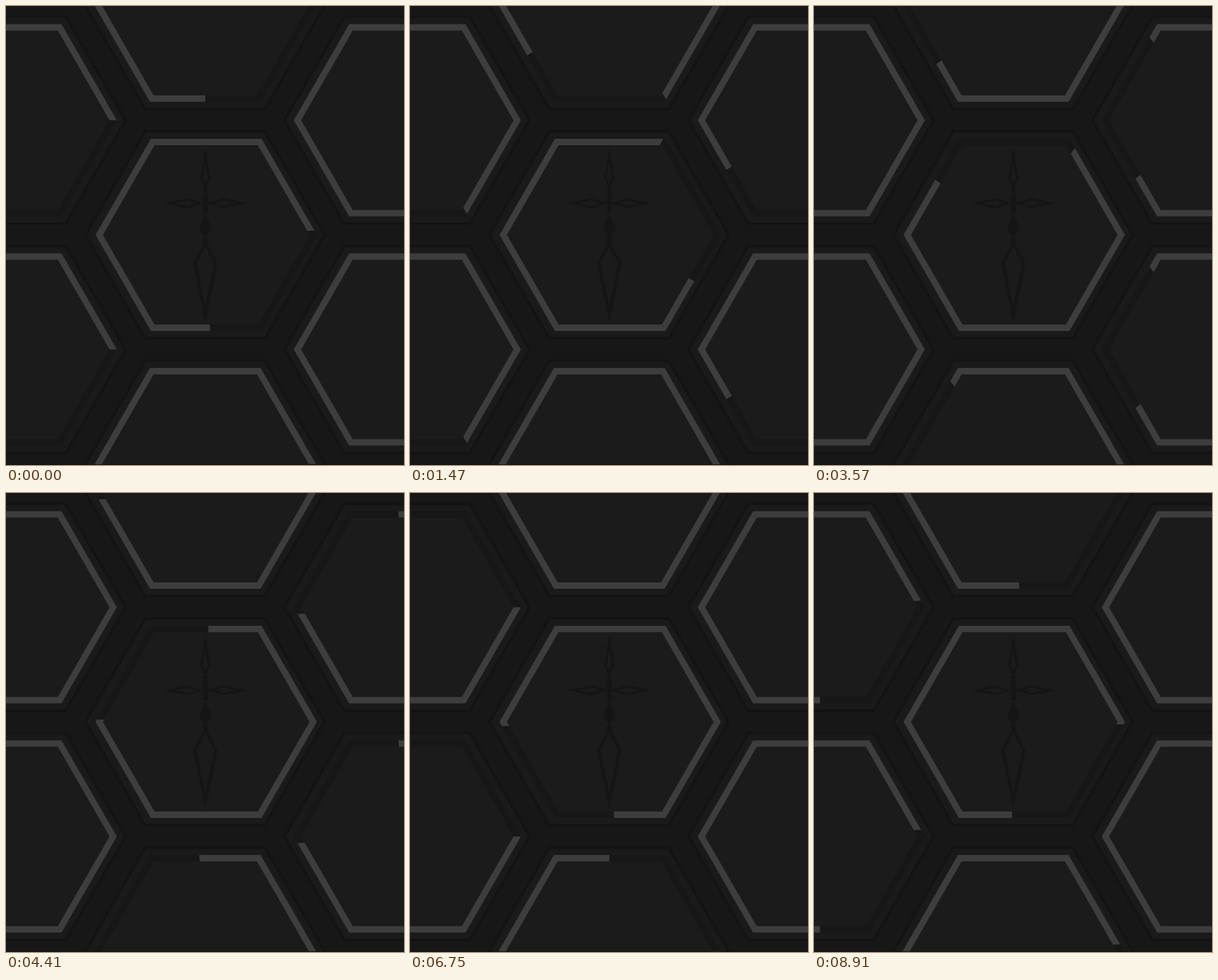
Animation of 623x719 px, one loop 8.94 s. Source, as an HTML page with a canvas:

```html
<!DOCTYPE html>
<html lang="en">
<head>
<meta charset="utf-8">
<title>Hexagon tiles</title>
<style>
html, body { margin: 0; width: 623px; height: 719px; overflow: hidden; background: #171717; }
canvas { display: block; }
</style>
</head>
<body>
<canvas width="623" height="719"></canvas>
<script>
const ctx = document.querySelector('canvas').getContext('2d');
const W = 623, H = 719, MID = 358.5;
const LOOP = 8940, STEP = 30, TURN = 9000;
const APOTHEM = 145.5, RADIUS = 167.5;
const PITCH_X = 311.7, PITCH_Y = 359;
const INK = '#151515', FACE = '#1b1b1b';

function hexagon(x, y, radius, apothem) {
  ctx.beginPath();
  for (let i = 0; i < 6; i++) {
    const a = i * Math.PI / 3;
    ctx.lineTo(x + radius * Math.cos(a), y + apothem * Math.sin(a) / Math.sin(Math.PI / 3));
  }
  ctx.closePath();
}

function fill(color) {
  ctx.fillStyle = color;
  ctx.fill();
}

function stroke(color, width) {
  ctx.strokeStyle = color;
  ctx.lineWidth = width;
  ctx.stroke();
}

// Calls the visitor for every cell of the honeycomb that touches the stage.
function eachCell(visit) {
  for (let col = -1; col <= 1; col++) {
    const last = col ? 0.5 : 1;
    for (let row = -last; row <= last; row++) visit(col, row);
  }
}

function drawPanel(col, row) {
  hexagon(W / 2 + col * W / 2, MID + row * PITCH_Y, 187.2, 162);
  fill('#1a1a1a');
  stroke('#131313', 4);
}

// The light border covers three quarters of a turn; the middle one runs backwards.
function drawBorder(col, row, time) {
  const middle = !col && !row;
  const x = 312 + col * PITCH_X + (middle ? 1.4 : 0);
  const y = MID + row * PITCH_Y;
  const turn = 2 * Math.PI * time / TURN;
  const angle = Math.PI / 2 + (middle ? -turn - 0.04 : turn);

  hexagon(x, y, RADIUS, APOTHEM);
  fill(FACE);
  stroke('#171717', 10);

  ctx.save();
  ctx.beginPath();
  ctx.moveTo(x, y);
  ctx.arc(x, y, 200, angle, angle + 1.5 * Math.PI);
  ctx.clip();
  hexagon(x, y, RADIUS, APOTHEM);
  stroke('#3d3d3d', 10);
  ctx.restore();
}

// A symmetric blade pointing away from the hilt, widest at distance mid:
// back and tip are lengths from there, hole is the scale of the cut-out.
function blade(angle, mid, half, back, tip, hole, neck = 0.5) {
  ctx.save();
  ctx.translate(312, 309);
  ctx.rotate(angle);
  ctx.translate(mid, 0);
  for (const [scale, color] of [[1, INK], [hole, FACE]]) {
    ctx.beginPath();
    for (const side of [1, -1]) {
      const s = side * half * scale;
      const line = [[tip * scale, 0], [0, s], [-back * scale * (1 - neck), s * neck], [-back * scale, 0]];
      for (const p of line) ctx.lineTo(...p);
    }
    fill(color);
  }
  ctx.restore();
}

function dot(y, r) {
  ctx.beginPath();
  ctx.arc(312, y, r, 0, 2 * Math.PI);
  fill(INK);
}

function drawSword() {
  const down = Math.PI / 2;
  blade(-down, 40, 8, 20, 47, 0.52);
  blade(0, 28, 8, 26, 38, 0.52);
  blade(Math.PI, 28, 8, 26, 38, 0.52);
  blade(down, 39, 10, 22, 16, 0);
  blade(down, 94, 19, 37, 94, 0.72, 0.35);
  ctx.fillRect(308.5, 293, 7, 32);
  ctx.fillStyle = INK;
  ctx.fillRect(308.5, 293, 7, 32);
  dot(288, 3.5);
  dot(368, 4.5);
}

function draw() {
  const time = Math.floor(performance.now() % LOOP / STEP) * STEP;
  ctx.fillStyle = '#171717';
  ctx.fillRect(0, 0, W, H);
  eachCell(drawPanel);
  eachCell((col, row) => drawBorder(col, row, time));
  drawSword();
  ctx.fillStyle = '#140f10';
  ctx.fillRect(0, H - 1, W, 1);
  requestAnimationFrame(draw);
}
draw();
</script>
</body>
</html>
```
